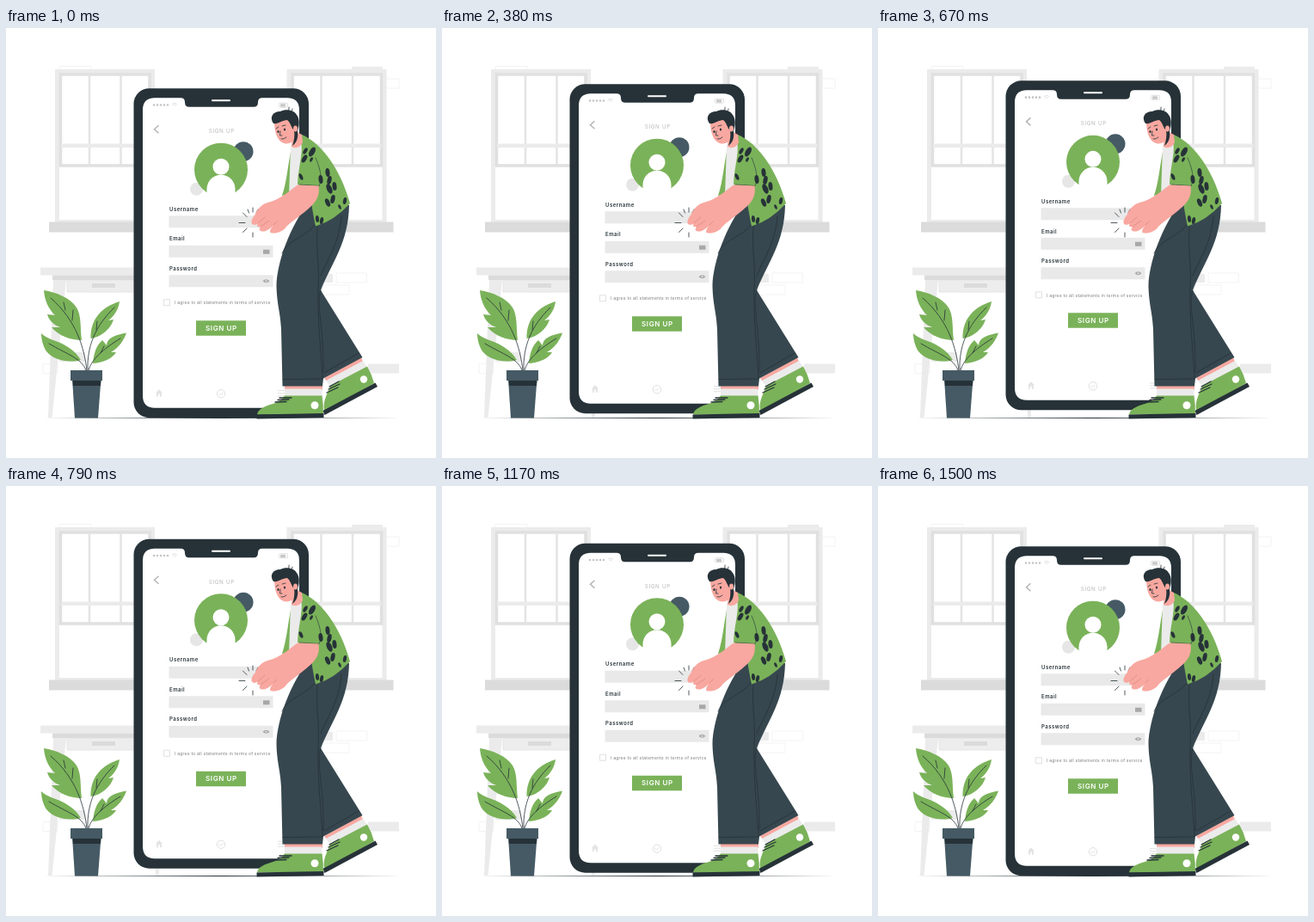
These frames come from a looping animation (500 by 500 pixels, 1.54 s). An HTML page:

```html
<!DOCTYPE html>
<html lang="en">
<head>
<meta charset="utf-8">
<title>Sign up</title>
<style>
  html, body { margin: 0; width: 100%; height: 100%; overflow: hidden; background: #fff; }
  svg { display: block; width: 100%; height: 100%; }
  text { font-family: Inter, sans-serif; }
  .green { fill: #7ab259; }
  .dark { fill: #263238; }
  .slate { fill: #37474f; }
  .blue { fill: #455a64; }
  .skin { fill: #f8a8a0; }
  .pale { fill: #ebebeb; }
  .grey { fill: #dbdbdb; }
  .line { fill: none; stroke: #263238; stroke-width: .8; stroke-linecap: round; stroke-linejoin: round; }
  .lace { stroke-width: 1.3; }
  .fold { stroke-width: .6; }
  .knuckle { stroke: #d67f73; stroke-width: .6; }
  .thin { fill: none; stroke: #f0f0f0; stroke-width: .8; }
  .icon { fill: none; stroke: #e0e0e0; stroke-width: 1; }
  .label { font-size: 6px; font-weight: 600; letter-spacing: .5px; fill: #263238; }
</style>
</head>
<body>
<svg viewBox="0 0 500 500">
  <defs>
    <g id="window">
      <path class="pale" fill-rule="evenodd" d="M57 48H173V227H57ZM62 53V223H168V53Z"/>
      <path fill="none" stroke="#e0e0e0" stroke-width="3.5" d="M63.5 160V54H167V160Z"/>
      <path fill="none" stroke="#e4e4e4" stroke-width="2.5" d="M97 54V159M133.500 54V159"/>
      <path class="pale" d="M64 134.500H167V139H64Z"/>
      <path class="grey" d="M50 225.500H181V237.500H50Z"/>
    </g>
  </defs>

  <g id="room">
    <use href="#window"/>
    <use href="#window" x="269.500"/>
    <path class="pale" d="M402 45H438V48H402ZM421 390.500H457V401.500H421Z"/>
    <path class="thin" d="M62 48V44.500H99V48M442 59H457V70H442M384 285H419.500V296H384ZM367 299H399V310H367ZM43 390.500H60V401.500H43Z"/>
    <path class="pale" d="M366 286H380V296H366Z"/>
    <path class="pale" d="M55 293H70L53.500 453H49ZM165 293H178V453H174ZM40 278.500H160V287.500H40ZM62 377H92V388H62Z"/>
    <path fill="#ededed" stroke="#e4e4e4" d="M71 293H160V307H71Z"/>
    <path class="grey" d="M54 287.500H160V293H54ZM100 297H127V302H100Z"/>
  </g>

  <g id="plant">
    <path class="green" d="M44 305C58 307 75 314 82 325C88 335 86 347 88 363C76 363 61 358 53 348L63 348C55 345 50 340 48 333L57 334C49 326 45 317 44 305Z
      M132 318C112 324 98 338 98.500 361C112 359 122 349 125 339L119 340C127 334 131 326 132 318Z
      M140 354.500C126 357 117 361 117 369L112 363C104 370 102 380 101 390C114 389 124 384 128 377L122 377C132 371 137 363 140 354.500Z
      M41 355C47 362 60 363 72 371C80 376 84 381 87 386C72 390 55 386 47 376C43 370 41 362 41 355Z"/>
    <path class="line" d="M94 398C91 372 82 340 52 314M95 398C94 370 104 346 126 325M96 398C99 386 113 373 133 361M93 398C88 384 72 380 50 367M77 340L78 328M69 328L67 319M105 351L106 341M110 378L114 370"/>
    <path class="blue" d="M77 408H110.500L107 453.500H80Z"/>
    <path class="dark" d="M77.500 409H110.500L110 416H78Z"/>
    <path class="blue" d="M75 398H112V410H75Z"/>
  </g>
  <path class="dark" d="M43 453.500L250 453L460 453.500L250 454Z"/>

  <g id="phone">
    <rect class="dark" x="148.500" y="70" width="203.500" height="383" rx="18"/>
    <path fill="#fff" d="M173 81H203Q208 81 208 86Q208 91.500 213 91.500H288Q293 91.500 293 86Q293 81 298 81H327Q341 81 341 95V427Q341 441.500 327 441.500H173Q159 441.500 159 427V95Q159 81 173 81Z"/>
    <path stroke="#fff" stroke-width="2" stroke-linecap="round" d="M240 84H260"/>
    <path stroke="#c4c4c4" stroke-width="2.600" stroke-linecap="round" stroke-dasharray="0 4" d="M172 89.300H188.500"/>
    <path class="icon" d="M193 88.500Q196 85.500 199 88.500M194.500 90Q196 88.500 197.500 90"/>
    <path fill="#c8c8c8" d="M319 88H325V91.500H319Z"/>
    <rect class="icon" x="317.500" y="87" width="10" height="5" rx="1"/>
    <path fill="none" stroke="#b5b5b5" stroke-width="1.500" d="M177.500 113L172.500 117.500L177.500 122"/>
    <text x="250.800" y="121.800" font-size="6.300" letter-spacing=".65" text-anchor="middle" fill="#b8b8b8">SIGN UP</text>

    <circle class="blue" cx="276" cy="143.500" r="11.500"/>
    <circle fill="#e6e6e6" cx="221.500" cy="187" r="7.500"/>
    <circle class="green" cx="250" cy="164.500" r="31"/>
    <circle fill="#fff" cx="250" cy="161" r="9.500"/>
    <path fill="#fff" d="M233.500 196V187A16.500 16.500 0 0 1 266.500 187V196Z"/>

    <path fill="#e9e9e9" d="M189.500 218H310.500V232H189.500ZM189.500 252.500H310.500V266.500H189.500ZM189.500 287H310.500V301H189.500Z"/>
    <text class="label" x="190" y="212.700">Username</text>
    <text class="label" x="190" y="247.200">Email</text>
    <text class="label" x="190" y="281.700">Password</text>
    <path fill="#a8a8a8" d="M299 257.500H306.500V262.500H299ZM298.500 294Q302.500 290 306.500 294Q302.500 298 298.500 294Z"/>
    <circle cx="302.500" cy="294" r="1" fill="#e9e9e9"/>
    <path class="icon" d="M183.500 315.500H190.500V322.500H183.500Z"/>
    <text x="196" y="321.200" font-size="5" letter-spacing=".22" fill="#7d7d7d">I agree to all statements in terms of service</text>
    <path class="green" d="M221 340H279V357.500H221Z"/>
    <text x="250.400" y="351.700" font-size="8" font-weight="600" letter-spacing=".6" text-anchor="middle" fill="#fff">SIGN UP</text>

    <path fill="#e4e4e4" d="M174 424L178 420L182 424H181V428.500H179V425.500H177V428.500H175V424Z"/>
    <circle class="icon" cx="250" cy="425" r="4.700"/>
    <path class="icon" d="M247.500 424.500L249.500 426.500L252.500 423.500M316 421.500H325M316 424.500H325M316 427.500H325"/>
  </g>

  <path class="line" d="M287 209V214M287 238V243M271 226.500H278M275.500 215L280 219.500M275.500 237.500L280 233M299 214L295 218M293 211L291 215M281 211L282.500 215"/>

  <g id="man">
    <!-- far leg and shoe -->
    <path class="skin" d="M370 407L413 383L415 388L373 411Z"/>
    <path class="pale" d="M372 410L415 387L420 394L377 417Z"/>
    <path class="green" d="M370 445C368 432 375 424 377 416L420 393.500Q425 402 428 413L371 446Z"/>
    <path class="dark" d="M368.500 445L429.500 412.500L432 417L370.500 450Z"/>
    <circle cx="416" cy="408.500" r="4.200" fill="#fff"/>
    <path class="line lace" d="M376 417L387 411M375 420L388 414M373 424L386 418"/>
    <!-- near shoe -->
    <path class="skin" d="M324 416H368V421H324Z"/>
    <path class="pale" d="M324 419.500H367.500V429H324Z"/>
    <path class="green" d="M292 449.500C293 443 300 440 312 436.500C318 434 322 431 324 427.500H367.500Q369 437 369 449Z"/>
    <path class="dark" d="M291.500 449.500L369.500 448V453L291.500 454.500Z"/>
    <circle cx="359" cy="438.700" r="4.500" fill="#fff"/>
    <path class="line lace" d="M318 430H332M316 432.500L329 432M313 435L326 434.500"/>
    <!-- trousers -->
    <path class="slate" d="M352 203C331 229 315 272 314.500 300C315 322 319 330 320 350L321.500 416.500H368L369 407.500L414.500 383L366 305C380 270 398 250 399 206Z"/>
    <path class="line" d="M359 229C349 243 326 247 321 262M362 231C360 258 365 278 363 302C362 340 366 370 368 407M366 305C360 320 370 350 369 400M322 408.500L368 408M370 401L410 378M390 219C388 250 372 272 366 288"/>
    <!-- shirt -->
    <path class="green" d="M333 135C328 155 327 178 321 195L332 193L340 140Z"/>
    <path class="pale" d="M331 136L345 133L341 184L329 196Z"/>
    <path class="green" d="M344 124C367 134 389 164 400 204Q382 224 360 230.500C358 220 355 208 354 190L339 181.500C340 160 346 145 343 132Z"/>
    <g id="spots" class="dark"></g>
    <path class="line fold" d="M341 182L364 183.500C369 175 364 160 360 151"/>
    <!-- arm and hand -->
    <path class="skin" d="M339 182.500L363.500 183.500C365 193 362 200 356 206C346 216 333 224 326 231C322 237 313 240 307.500 238C306 235 309 232 311 229C306 235 301 237 298 236.500C294 236 294 234 296 231C292 232 291 230 293 227C290 230 286 229 285.500 226.500C285 223 288 219 290 216.500C293 209 299 204 306 202.500C319 199 329 190 339 182.500Z"/>
    <path class="line knuckle" d="M293 227L301 220M296 231L306 224M311 229L315 225"/>
    <!-- head -->
    <path class="skin" d="M333 118L344 124L345 133Q340 142 332 138Z"/>
    <path class="skin" d="M312 108C312 122 316 134 326 134.500C334 135 339 126 339 113L330 104Z"/>
    <path class="dark" d="M311 111C306 104 310 97 319 97C326 93 336 96 338 101C342 106 341 114 339 120C340 128 338 133 333 137C335 131 336 125 335 119C332 117 331 110 327 107C321 107 317 112 311 111Z"/>
    <ellipse class="skin" cx="336.500" cy="117" rx="2.500" ry="3.500"/>
    <path class="line" d="M329 92Q328 96 330 99M333 94L332 98M314 117L317 115M321 114L325 113M319 120L318.500 125L321 125M320 129Q323 130 326 127"/>
    <ellipse class="dark" cx="316.500" cy="120.500" rx="1.100" ry="1.600"/>
    <ellipse class="dark" cx="324" cy="118" rx="1.100" ry="1.600"/>
  </g>
</svg>
<script>
  const phone = document.getElementById('phone');
  const LOOP = 1540, STEP = 41.66;
  const FLOAT = 1500, TOP_TIME = 715, TOP = -9.3, TRAVEL = 10;

  // Shirt pattern: x, y, long radius
  const spots = [[356, 144, 6], [348, 143, 4], [347, 152, 5], [355, 153, 3], [374, 168, 5],
    [376, 177, 5], [376, 187, 6], [382, 184, 5], [380, 199, 5], [374, 203, 5], [366, 176, 5],
    [394, 201, 4], [343, 173, 4], [362, 222, 4], [367, 224, 4], [388, 208, 3]];
  document.getElementById('spots').innerHTML = spots.map(([x, y, r], i) =>
    `<ellipse rx="${r * 0.5}" ry="${r}" transform="translate(${x} ${y}) rotate(${y < 160 ? 30 : i % 3 * 18 - 24})"/>`).join('');

  // The phone floats up and down at constant speed, stepped at 24 fps.
  function draw(now) {
    const t = Math.floor((now % LOOP + 2) / STEP) * STEP;
    const away = Math.abs(t - TOP_TIME);
    const y = TOP + TRAVEL * Math.min(away, FLOAT - away) / (FLOAT / 2);
    phone.setAttribute('transform', `translate(0 ${y})`);
    requestAnimationFrame(draw);
  }
  draw(performance.now());
</script>
</body>
</html>
```
